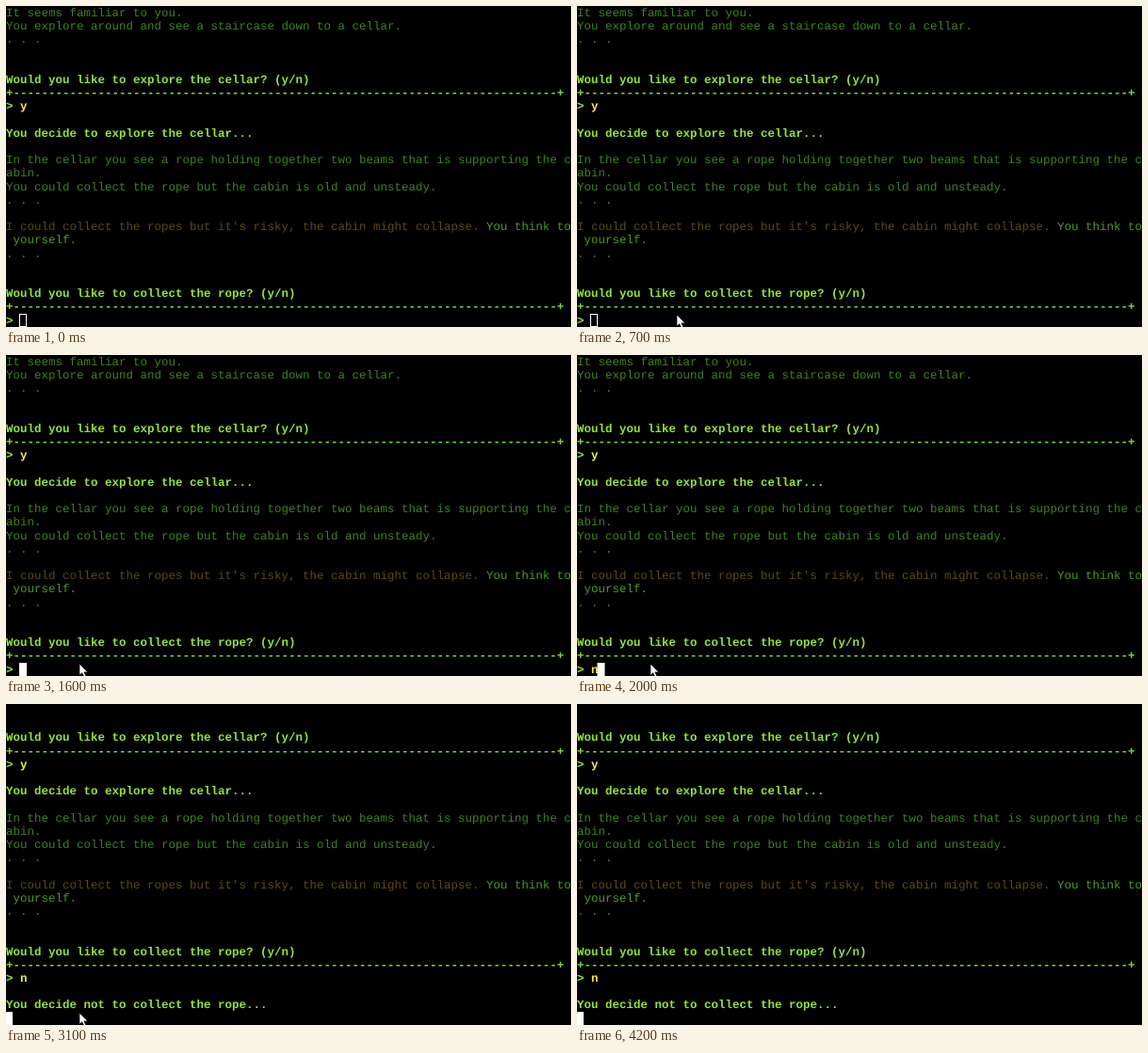
An HTML page for the animation above (4.6 s loop, 600 by 341 pixels).

```html
<!DOCTYPE html>
<html lang="en">
<head>
<meta charset="utf-8">
<title>Cabin text adventure</title>
<style>
  html, body { margin: 0; width: 100%; height: 100%; overflow: hidden; background: #000; }
  svg { display: block; width: 600px; height: 341px; }
  text {
    font: 12.5px "Liberation Mono", "Courier New", monospace;
    text-rendering: geometricPrecision;
    white-space: pre;
  }
  .dim { fill: #3d8220; }
  .say { fill: #4b9a26; }
  .thought { fill: #5c4913; }
  .ask { fill: #90e636; font-weight: bold; }
  .rule { fill: #80d630; font-weight: bold; }
  .input { fill: #f0ee4c; font-weight: bold; }
</style>
</head>
<body>
<svg viewBox="0 0 600 341">
  <g id="screen"></g>
  <rect id="cursor" stroke="#fff"/>
  <path id="pointer" d="M0 0V12.2L2.8 9.7L5 14.4L7 13.4L4.9 8.9H8.8Z"
        fill="#fff" stroke="#000" stroke-width=".7"/>
</svg>
<script>
const LOOP = 4600, CHAR = 7.5, ROW = 14.2, BASE = 11;
const FILL_AT = 1000, TYPE_AT = 2000, SCROLL_AT = 3100;
const rule = "+" + "-".repeat(77) + "+";

// row, column, style, text
const lines = [
  [0, 0, "dim", "It seems familiar to you."],
  [1, 0, "dim", "You explore around and see a staircase down to a cellar."],
  [2, 0, "dim", ". . ."],
  [5, 0, "ask", "Would you like to explore the cellar? (y/n)"],
  [6, 0, "rule", rule],
  [7, 0, "ask", ">"],
  [7, 2, "input", "y"],
  [9, 0, "ask", "You decide to explore the cellar..."],
  [11, 0, "dim", "In the cellar you see a rope holding together two beams that is supporting the c"],
  [12, 0, "dim", "abin."],
  [13, 0, "dim", "You could collect the rope but the cabin is old and unsteady."],
  [14, 0, "dim", ". . ."],
  [16, 0, "thought", "I could collect the ropes but it's risky, the cabin might collapse."],
  [16, 68, "say", "You think to"],
  [17, 1, "say", "yourself."],
  [18, 0, "dim", ". . ."],
  [21, 0, "ask", "Would you like to collect the rope? (y/n)"],
  [22, 0, "rule", rule],
  [23, 0, "ask", ">"],
];

// time, x, y of the mouse pointer; null hides it
const path = [
  [0, null], [100, 226, 339], [200, 208, 336], [300, 190, 332], [400, 170, 329],
  [500, 148, 328], [600, 126, 328], [700, 106, 328], [800, 89, 328],
  [900, 78, 328], [3200, null],
];

const $ = id => document.getElementById(id);
const screen = $("screen"), cursor = $("cursor"), pointer = $("pointer");

function setAttrs(el, attrs) {
  for (const name in attrs) el.setAttribute(name, attrs[name]);
}

function addText([row, col, style, words]) {
  const el = document.createElementNS("http://www.w3.org/2000/svg", "text");
  setAttrs(el, { x: col * CHAR, y: BASE + row * ROW, class: style });
  el.textContent = words;
  return screen.appendChild(el);
}

lines.forEach(addText);
const answer = addText([23, 2, "input", "n"]);
const result = addText([25, 0, "ask", "You decide not to collect the rope..."]);

function show(el, on) {
  el.style.display = on ? "" : "none";
}

function draw(t) {
  const scrolled = t >= SCROLL_AT, typed = t >= TYPE_AT;
  screen.setAttribute("transform", `translate(0 ${scrolled ? -3 * ROW : 0})`);
  show(answer, typed);
  show(result, scrolled);

  const x = scrolled ? -0.5 : typed ? 22 : 14.5;
  setAttrs(cursor, {
    x, y: 327.5, width: 7, height: 13,
    fill: t >= FILL_AT ? "#fff" : "none",
  });

  const [, px, py] = path.filter(step => step[0] <= t).pop();
  show(pointer, px !== null);
  if (px !== null) pointer.setAttribute("transform", `translate(${px} ${py})`);
}

const start = performance.now();
function tick() {
  draw((performance.now() - start) % LOOP);
  requestAnimationFrame(tick);
}
tick();
</script>
</body>
</html>
```
